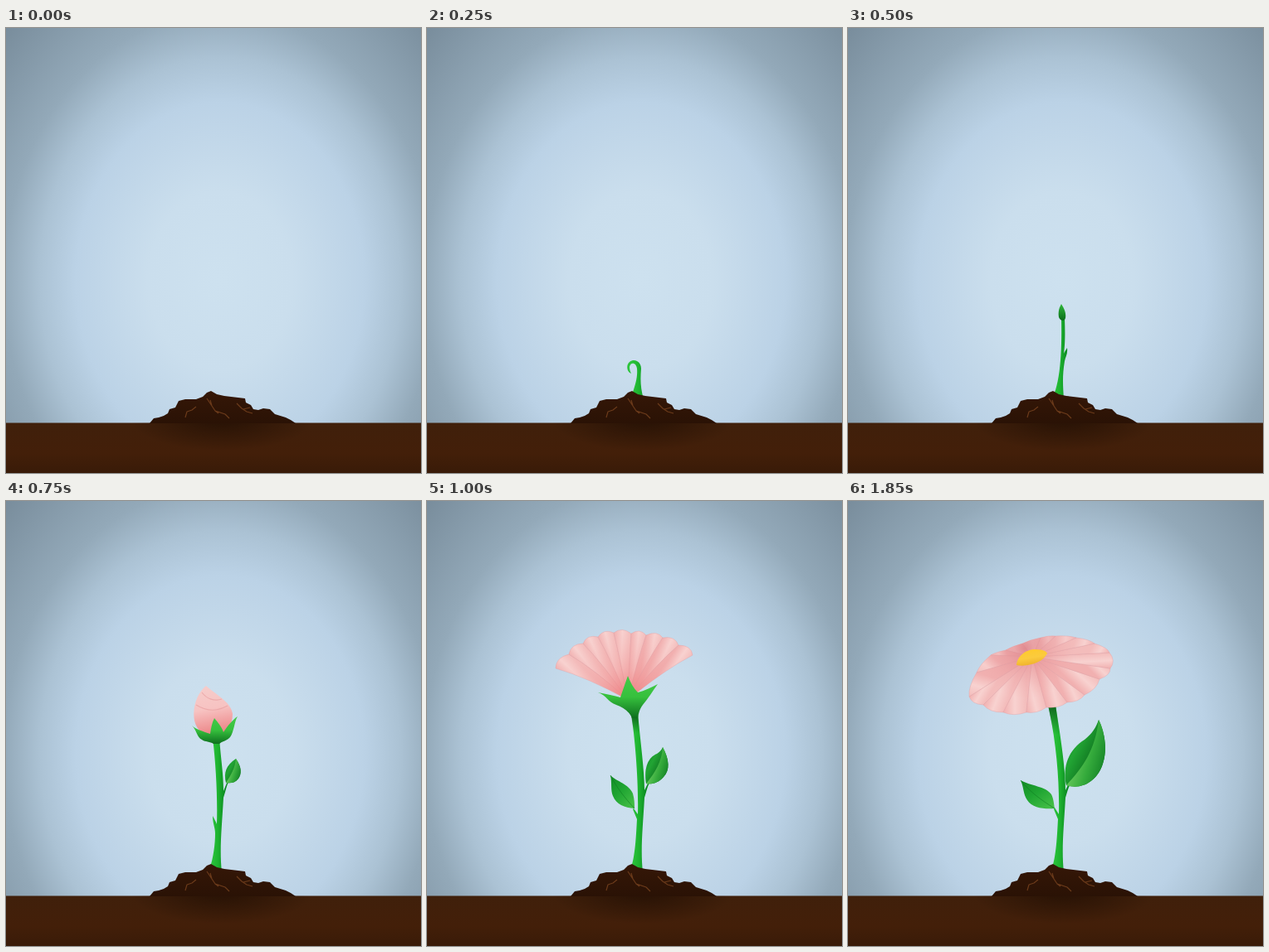
Write an HTML page that moves like this. It is 500 px wide and 537 px high and loops after 2.25 s.

```html
<!DOCTYPE html>
<html lang="en">
<head>
<meta charset="utf-8">
<title>Growing flower</title>
<style>
  html, body { margin: 0; width: 100%; height: 100%; overflow: hidden; }
  svg { display: block; width: 100%; height: 100%; }
  .stage { display: none; }
  .stage.on { display: inline; }
  .rib { fill: none; stroke: #0d7a20; stroke-width: .8; opacity: .7; }
  .crack { fill: none; stroke: #6b3a1a; stroke-width: 1.2; stroke-linejoin: round; }
</style>
</head>
<body>
<svg viewBox="0 0 500 537" preserveAspectRatio="none">
  <defs>
    <radialGradient id="sky" gradientUnits="userSpaceOnUse" cx="0" cy="0" r="1.45"
      gradientTransform="translate(258 305) scale(250 310)">
      <stop offset="0" stop-color="#cde1ef"/>
      <stop offset=".24" stop-color="#cadeed"/>
      <stop offset=".48" stop-color="#bbd2e6"/>
      <stop offset=".6" stop-color="#abc2d4"/>
      <stop offset=".72" stop-color="#93a9b9"/>
      <stop offset="1" stop-color="#778b9a"/>
    </radialGradient>
    <linearGradient id="ground" x2="0" y2="1">
      <stop offset="0" stop-color="#40200b"/>
      <stop offset=".6" stop-color="#431f09"/>
      <stop offset="1" stop-color="#391b08"/>
    </linearGradient>
    <radialGradient id="shade" gradientUnits="userSpaceOnUse" cx="0" cy="0" r="1"
      gradientTransform="translate(260 472) scale(110 38)">
      <stop offset="0" stop-color="#241004" stop-opacity=".9"/>
      <stop offset="1" stop-color="#241004" stop-opacity="0"/>
    </radialGradient>
    <linearGradient id="mound" x2="0" y2="1">
      <stop offset="0" stop-color="#351707"/>
      <stop offset="1" stop-color="#2a1205"/>
    </linearGradient>
    <linearGradient id="stem" gradientUnits="userSpaceOnUse" x1="247" x2="264">
      <stop offset="0" stop-color="#2cc43c"/>
      <stop offset=".5" stop-color="#1db32f"/>
      <stop offset="1" stop-color="#0c8a22"/>
    </linearGradient>
    <linearGradient id="stemShadow" x2="0" y2="1">
      <stop offset="0" stop-color="#0a5218" stop-opacity=".85"/>
      <stop offset="1" stop-color="#0a5218" stop-opacity="0"/>
    </linearGradient>
    <linearGradient id="leaf" x1=".1" y1=".2" x2=".65" y2=".65">
      <stop offset="0" stop-color="#129029"/>
      <stop offset=".4" stop-color="#22a534"/>
      <stop offset="1" stop-color="#0f7420"/>
    </linearGradient>
    <linearGradient id="leafSide" x1=".3" y1=".5" x2="1" y2=".85">
      <stop offset="0" stop-color="#5cc254"/>
      <stop offset=".4" stop-color="#35ab3c"/>
      <stop offset="1" stop-color="#0f7d23"/>
    </linearGradient>
    <linearGradient id="smallLeaf" x2=".8" y2="1">
      <stop offset="0" stop-color="#118a25"/>
      <stop offset=".5" stop-color="#1fa532"/>
      <stop offset="1" stop-color="#43bd45"/>
    </linearGradient>
    <linearGradient id="calyx" x2="0" y2="1">
      <stop offset="0" stop-color="#44cb48"/>
      <stop offset=".5" stop-color="#36c03d"/>
      <stop offset="1" stop-color="#0e6f1f"/>
    </linearGradient>
    <linearGradient id="tip" x2="0" y2="1">
      <stop offset="0" stop-color="#2fb83a"/>
      <stop offset="1" stop-color="#0b6d1b"/>
    </linearGradient>
    <linearGradient id="bud" x2=".15" y2="1">
      <stop offset="0" stop-color="#f6cdcb"/>
      <stop offset=".5" stop-color="#f7c3c2"/>
      <stop offset="1" stop-color="#ec8587"/>
    </linearGradient>
    <radialGradient id="fanDepth" gradientUnits="userSpaceOnUse" cx="242" cy="240" r="85">
      <stop offset="0" stop-color="#ee7376" stop-opacity=".9"/>
      <stop offset=".45" stop-color="#f08e8f" stop-opacity=".4"/>
      <stop offset="1" stop-color="#f3a9a8" stop-opacity="0"/>
    </radialGradient>
    <radialGradient id="discDepth" gradientUnits="userSpaceOnUse" cx="214" cy="178" r="60">
      <stop offset="0" stop-color="#dc7f86" stop-opacity=".75"/>
      <stop offset="1" stop-color="#f0a5a6" stop-opacity="0"/>
    </radialGradient>
    <linearGradient id="eye" x2=".3" y2="1">
      <stop offset="0" stop-color="#ffc928"/>
      <stop offset=".6" stop-color="#fbcb3e"/>
      <stop offset="1" stop-color="#f0b32c"/>
    </linearGradient>
  </defs>

  <rect width="500" height="537" fill="url(#sky)"/>

  <g class="stage"></g>

  <g class="stage">
    <path fill="url(#stem)" d="M246 445C251 431 254 421 253 411C252 403 245 403 244 409C244 412 245 415 246 417C240 415 240 406 244 403C250 398 258 403 258 411C257 424 257 434 261 448Z"/>
  </g>

  <g class="stage">
    <path fill="url(#stem)" d="M247 445C255 427 258 396 257 350L261 350C262 375 261 385 260 393C261 390 263 388 264 386C265 393 262 397 261 402C258 420 259 432 260 448Z"/>
    <path fill="url(#tip)" d="M257 333C254 338 253 344 254 349C256 354 261 354 262 350C263 343 260 338 257 333Z"/>
  </g>

  <g class="stage">
    <path fill="url(#stem)" d="M245 445C250 430 252 414 252 401C252 394 249 389 249 380C251 384 253 387 254 390C255 360 253 318 249 286L257 286C259 312 262 330 262 350L267 338L268 339C265 346 264 352 262 358C260 395 257 420 260 448Z"/>
    <path fill="url(#leaf)" d="M265 340C262 328 265 319 277 311C284 321 284 329 280 335C276 340 271 341 265 340Z"/>
    <path fill="url(#leafSide)" d="M265 340C271 331 276 322 277 311C284 321 284 329 280 335C276 340 271 341 265 340Z"/>
    <path fill="url(#bud)" d="M241 223C231 231 224 248 227 265C230 277 238 283 250 284C264 283 273 272 273 257C271 243 256 236 241 223Z"/>
    <g fill="none" stroke="#e9a3a4" stroke-width="1.2" opacity=".75">
      <path d="M229 246C240 253 253 255 267 247"/>
      <path d="M236 231C242 239 251 242 260 239"/>
    </g>
    <path fill="url(#calyx)" d="M224 271C229 276 238 278 246 281C247 274 248 268 251 262C255 267 260 272 262 279C268 270 273 264 279 260C275 266 275 278 270 285C267 289 260 290 257 293L250 293C246 290 240 291 236 288C230 285 230 277 224 271Z"/>
  </g>

  <g class="stage">
    <path fill="url(#stem)" d="M245 445C251 430 252 402 253 384L248 372L249 371L254 378C255 340 251 290 246 256L254 256C257 290 262 325 262 349L267 339L268 340C265 346 264 352 262 358C260 395 257 420 260 448Z"/>
    <path fill="url(#stemShadow)" d="M246 258L254 258L256 280L249 280Z"/>
    <path fill="url(#leaf)" d="M264 341C261 321 267 309 277 305C281 302 283 300 284 297C292 312 293 325 285 333C279 340 272 342 264 341Z"/>
    <path fill="url(#leafSide)" d="M264 341C275 328 283 314 284 297C292 312 293 325 285 333C279 340 272 342 264 341Z"/>
    <path fill="url(#smallLeaf)" d="M221 331C229 339 243 341 248 353C250 360 250 366 250 371C238 370 228 366 224 356C221 349 223 340 221 331Z"/>
    <path class="rib" d="M221 331C228 345 238 358 250 371"/>
    <g id="fan"></g>
    <path fill="url(#calyx)" d="M206 231C216 233 226 235 233 237C236 228 239 219 242 211C245 219 249 226 254 231C262 229 270 225 278 221C272 229 266 239 260 246C256 251 255 256 254 262L247 262C244 254 236 249 228 246C218 243 216 234 206 231Z"/>
  </g>

  <g class="stage">
    <path fill="url(#stem)" d="M245 445C251 430 252 402 253 384L248 372L249 370L254 378C255 340 251 290 241 246L250 246C257 290 262 325 262 349L266 341L268 342C265 346 264 352 262 358C260 395 257 420 260 448Z"/>
    <path fill="url(#stemShadow)" d="M241 246L250 246L255 282L248 282Z"/>
    <path fill="url(#leaf)" d="M263 343C258 320 266 300 285 288C294 281 299 273 302 264C310 280 313 303 306 320C299 338 282 349 263 343Z"/>
    <path fill="url(#leafSide)" d="M263 343C283 322 298 300 302 264C310 280 313 303 306 320C299 338 282 349 263 343Z"/>
    <path fill="url(#smallLeaf)" d="M208 337C220 344 238 344 245 354C248 360 248 366 249 371C238 372 222 371 216 361C211 354 212 346 208 337Z"/>
    <path class="rib" d="M208 337C219 351 233 361 249 371"/>
    <g id="disc"></g>
    <path fill="url(#eye)" d="M203 198C204 187 214 179 226 179C235 179 240 182 240 184C236 191 230 195 221 197C214 199 208 199 203 198Z"/>
  </g>

  <rect y="476.5" width="500" height="60.5" fill="url(#ground)"/>
  <rect x="150" y="476.5" width="220" height="60.5" fill="url(#shade)"/>
  <path fill="url(#mound)" d="M173 477L178 471L184 470L190 468L195 465L197 460L204 458L208 450L216 448L229 448L237 445L242 440L247 438L254 442L263 444L288 447L289 452L295 455L298 460L304 461L310 459L318 460L324 466L337 470L343 473L349 477Z"/>
  <path class="crack" d="M216 470L218 463L224 461L229 457M242 447L248 456L252 462L264 466L269 471M246 449L248 456M252 462L256 465M278 453L284 459L290 463L297 465M286 460L294 458"/>
</svg>
<script>
const NS = 'http://www.w3.org/2000/svg';
const STEP = 250, LOOP = 2250;

function add(parent, tag, attrs) {
  const node = document.createElementNS(NS, tag);
  for (const key in attrs) node.setAttribute(key, attrs[key]);
  return parent.appendChild(node);
}

// Petals fan out from a hub; each spans two neighbouring rim points.
function drawPetals(id, hub, rim, { lift, bulge, depth, closed }) {
  const group = document.getElementById(id);
  const [hx, hy] = hub;
  const side = ([x, y]) => `${hx + (x - hx) * .55} ${hy + (y - hy) * .55 - lift}`;
  const count = closed ? rim.length : rim.length - 1;
  let all = '';
  for (let i = 0; i < count; i++) {
    const a = rim[i], b = rim[(i + 1) % rim.length];
    const mx = (a[0] + b[0]) / 2, my = (a[1] + b[1]) / 2;
    const crest = `${mx + (mx - hx) * bulge} ${my + (my - hy) * bulge}`;
    const d = `M${hub}Q${side(a)} ${a}Q${crest} ${b}Q${side(b)} ${hub}Z`;
    const tint = add(group, 'linearGradient', {
      id: id + i, gradientUnits: 'userSpaceOnUse', x1: a[0], y1: a[1], x2: b[0], y2: b[1]
    });
    add(tint, 'stop', { offset: 0, 'stop-color': '#f1b0b0' });
    add(tint, 'stop', { offset: .5, 'stop-color': '#f8d2d0' });
    add(tint, 'stop', { offset: 1, 'stop-color': '#f3bcbb' });
    add(group, 'path', { d, fill: `url(#${id}${i})`, stroke: '#e29a9c', 'stroke-width': .6, 'stroke-opacity': .6 });
    all += d;
  }
  add(group, 'path', { d: all, fill: `url(#${depth})` });
}

drawPetals('fan', [242, 240],
  [[155, 202], [171, 185], [188, 172], [206, 164], [225, 159], [246, 160],
   [264, 162], [284, 165], [303, 174], [320, 186]],
  { lift: 6, bulge: .1, depth: 'fanDepth' });

drawPetals('disc', [222, 188],
  [[146, 236], [163, 246], [187, 255], [215, 255], [239, 249], [264, 243], [285, 234],
   [303, 215], [316, 202], [315, 183], [297, 172], [275, 165], [250, 163], [232, 165],
   [210, 172], [190, 180], [172, 186], [155, 207]],
  { lift: 0, bulge: .08, depth: 'discDepth', closed: true });

const stages = [...document.querySelectorAll('.stage')];
const start = performance.now();

function render() {
  const time = (performance.now() - start) % LOOP;
  const current = Math.min(stages.length - 1, Math.floor(time / STEP));
  stages.forEach((stage, i) => stage.classList.toggle('on', i === current));
  requestAnimationFrame(render);
}
render();
</script>
</body>
</html>
```
